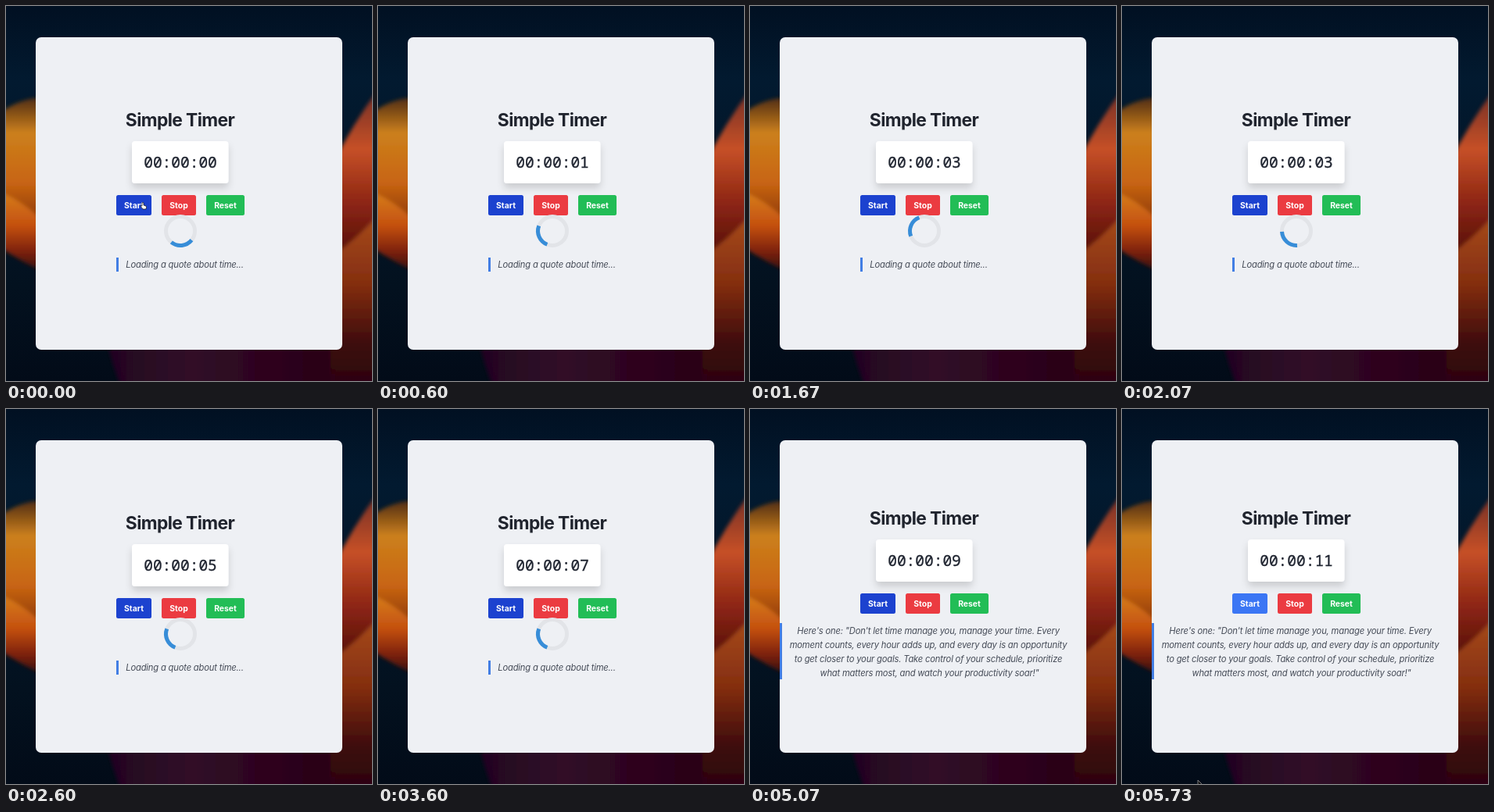
Write an HTML page that moves like this. It is 468 px wide and 480 px high and loops after 5.79 s.

```html
<!DOCTYPE html>
<html lang="en">
<head>
<meta charset="utf-8">
<title>Simple Timer</title>
<style>
  html, body { margin: 0; height: 100%; overflow: hidden; background: #021326; }
  svg { display: block; width: 468px; height: 480px; }
  text { font-family: Inter, "Open Sans", sans-serif; text-anchor: middle; }
  .title { font-size: 22.8px; font-weight: 700; letter-spacing: -.026em; fill: #20242e; }
  .clock { font: 19.5px "Noto Sans Mono", monospace; fill: #1f2430; stroke: #1f2430; stroke-width: .35; }
  .label { font-size: 10.4px; font-weight: 700; fill: #fff; }
  .quote { font-size: 11.2px; font-style: italic; letter-spacing: -.016em; fill: #454b57; }
</style>
</head>
<body>
<svg viewBox="0 0 468 480">
  <defs>
    <linearGradient id="sky" x2="0" y2="1">
      <stop stop-color="#011022"/><stop offset=".2" stop-color="#021a30"/>
      <stop offset=".75" stop-color="#03111f"/><stop offset="1" stop-color="#020b18"/>
    </linearGradient>
    <linearGradient id="leftTop" x2="0" y2="1">
      <stop stop-color="#4e2c14"/><stop offset=".25" stop-color="#cc801c"/>
      <stop offset=".6" stop-color="#c86412"/><stop offset="1" stop-color="#6e2408"/>
    </linearGradient>
    <linearGradient id="leftLow" x2="0" y2="1">
      <stop stop-color="#d67e1c"/><stop offset=".4" stop-color="#c4500f"/>
      <stop offset=".7" stop-color="#7e220a"/><stop offset="1" stop-color="#200a12"/>
    </linearGradient>
    <linearGradient id="rightTop" x2="0" y2="1">
      <stop stop-color="#6e2c26"/><stop offset=".35" stop-color="#c65028"/>
      <stop offset=".65" stop-color="#8e2612"/><stop offset="1" stop-color="#4a0c10"/>
    </linearGradient>
    <linearGradient id="rightLow" x2="0" y2="1">
      <stop stop-color="#a84c1a"/><stop offset=".4" stop-color="#842e10"/>
      <stop offset=".75" stop-color="#3c0a10"/><stop offset="1" stop-color="#2a0412"/>
    </linearGradient>
    <linearGradient id="floor">
      <stop stop-color="#22061f"/><stop offset=".3" stop-color="#300828"/>
      <stop offset=".7" stop-color="#2c051a"/><stop offset="1" stop-color="#2a0412"/>
    </linearGradient>
    <filter id="soft" x="-20%" y="-20%" width="140%" height="140%"><feGaussianBlur stdDeviation="2.5"/></filter>
    <filter id="shadow" x="-20%" y="-30%" width="140%" height="180%">
      <feDropShadow dx="0" dy="6" stdDeviation="5" flood-color="#000" flood-opacity=".15"/>
    </filter>
  </defs>

  <rect width="468" height="480" fill="url(#sky)"/>
  <g filter="url(#soft)">
    <path d="M128 425Q136 460 148 490H478V425Z" fill="url(#floor)"/>
    <path d="M-9 138Q20 115 60 117V300L-9 255Z" fill="url(#leftTop)"/>
    <path d="M-9 238Q25 250 60 288V346Q20 328 -9 308Z" fill="url(#leftLow)"/>
    <path d="M478 104Q445 148 415 207V330H478Z" fill="url(#rightTop)"/>
    <path d="M415 322Q450 297 478 266V490H415Z" fill="url(#rightLow)"/>
  </g>

  <rect x="38" y="40" width="392" height="400" rx="7" fill="#eef0f4"/>
  <g id="panel">
    <text class="title" x="222.5" y="154">Simple Timer</text>
    <rect x="161" y="173" width="123.500" height="54" rx="4" fill="#fff" filter="url(#shadow)"/>
    <text class="clock" id="clock" x="223" y="206.500">00:00:00</text>
    <rect id="start" x="141" y="242" width="45" height="26" rx="2.500"/>
    <rect x="199" y="242" width="44" height="26" rx="2.500" fill="#eb3b41"/>
    <rect x="256" y="242" width="49" height="26" rx="2.500" fill="#22bd56"/>
    <text class="label" x="163.500" y="259">Start</text>
    <text class="label" x="221" y="259">Stop</text>
    <text class="label" x="280.500" y="259">Reset</text>
  </g>

  <g id="loading">
    <g fill="none" stroke-width="5">
      <circle cx="223" cy="288" r="18.500" stroke="#e2e4e8"/>
      <circle id="arc" cx="223" cy="288" r="18.500" stroke="#378dd8" pathLength="360" stroke-dasharray="90 270"/>
    </g>
    <rect x="141" y="322" width="3" height="18" fill="#427ee4"/>
    <text class="quote" x="228.500" y="335">Loading a quote about time...</text>
  </g>
  <g id="loaded">
    <rect x="38" y="274" width="3" height="72" fill="#427ee4"/>
    <text class="quote">
      <tspan x="229.500" y="287.500">Here's one: "Don't let time manage you, manage your time. Every</tspan>
      <tspan x="229.500" y="305.500">moment counts, every hour adds up, and every day is an opportunity</tspan>
      <tspan x="229.500" y="323.500">to get closer to your goals. Take control of your schedule, prioritize</tspan>
      <tspan x="229.500" y="341.500">what matters most, and watch your productivity soar!"</tspan>
    </text>
  </g>

  <path id="hand" d="M174 252q1-1 2 0v3l3 1q1 1 0 4h-4l-3-4q0-1 2 0z" fill="#fff" stroke="#111" stroke-width=".7"/>
  <path id="arrow" d="M0 0V9L2 7L4 11L5.500 10L4 6.500H6.500Z" fill="#111" stroke="#999" stroke-width=".8"/>
</svg>

<script>
const LOOP = 5790, HAND_HIDES = 500, QUOTE_AT = 5000, LEAVE_AT = 5300, LAST = 5730;
const el = id => document.getElementById(id);
const show = (id, on) => el(id).setAttribute("display", on ? "inline" : "none");
const move = (id, value) => el(id).setAttribute("transform", value);

function draw(now) {
  const step = Math.floor((Math.floor(now % LOOP / 10) + .5) * .15);
  const t = step * 200 / 3;
  const loaded = t >= QUOTE_AT, leaving = t >= LEAVE_AT;

  const seconds = Math.max(0, Math.floor((t - 85) / 500));
  el("clock").textContent = "00:00:" + String(seconds).padStart(2, "0");
  move("arc", `rotate(${39 + t * .72} 223 288)`);
  move("panel", `translate(0 ${loaded ? -6 : 0})`);
  el("start").setAttribute("fill", leaving ? "#3b76f4" : "#1c42cf");

  show("loading", !loaded);
  show("loaded", loaded);
  show("hand", t < HAND_HIDES);
  show("arrow", leaving);
  const p = Math.min(1, Math.max(0, (t - LEAVE_AT) / (LAST - LEAVE_AT)));
  const ease = p * p * (3 - 2 * p);
  move("arrow", `translate(${174 - 77 * ease} ${252 + 223 * ease})`);
}

const begin = performance.now();
function tick() {
  draw(performance.now() - begin);
  requestAnimationFrame(tick);
}
tick();
</script>
</body>
</html>
```
